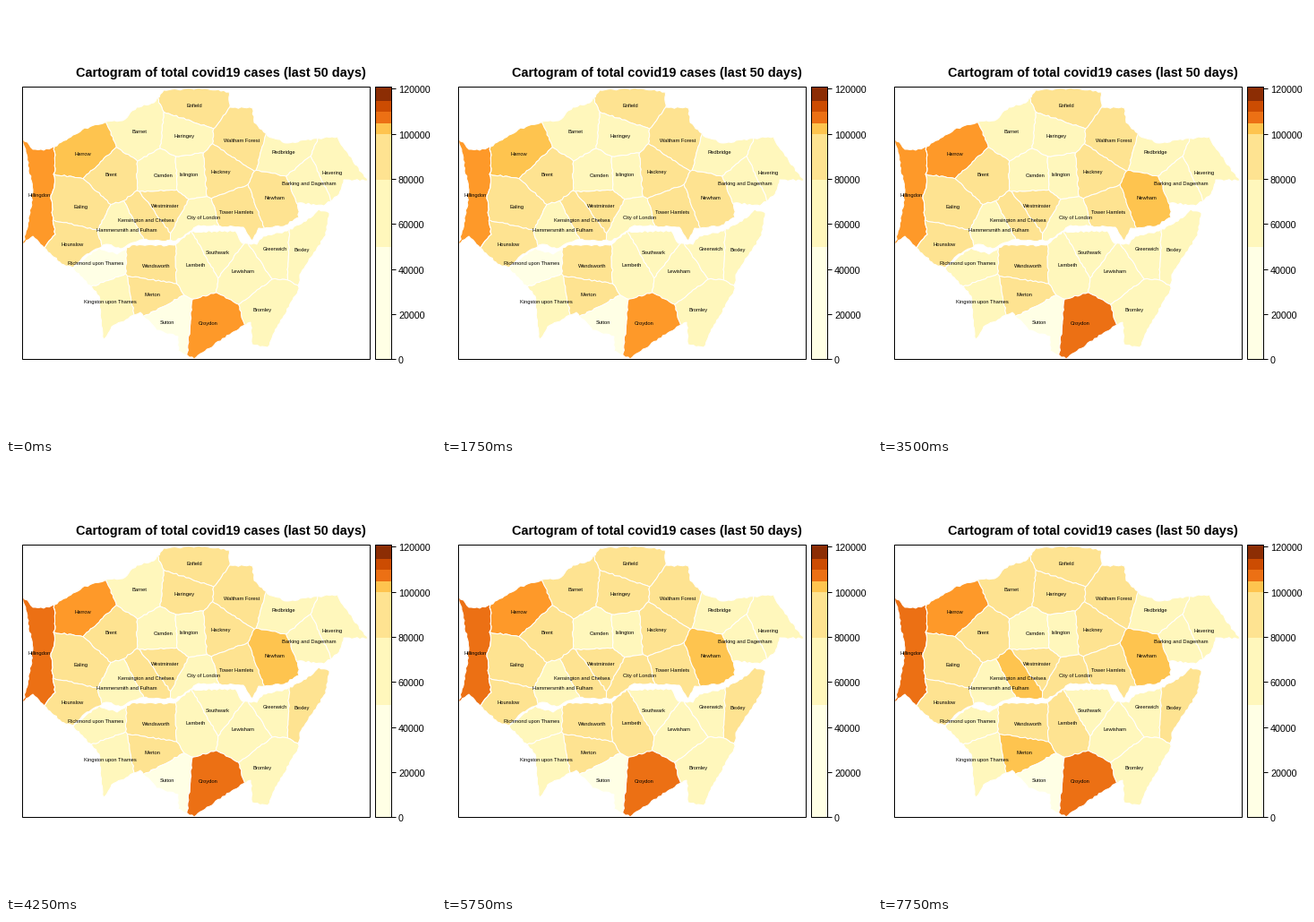
A matplotlib script that plays this animation: 480 px wide and 480 px high, repeating every 8000 ms.

```python
import random

import matplotlib.pyplot as plt
from matplotlib.animation import FuncAnimation
from matplotlib.patches import Polygon, Rectangle

SIZE, DPI = 480, 72
FRAMES, STEP_MS = 32, 250
SHADES = ["#FFFFE5", "#FFF7BC", "#FEE391", "#FEC44F",
          "#FE9929", "#EC7014", "#CC4C02", "#8C2D04"]

# Boroughs by land mass: name, label x and y, first shade
WEST = [("Hillingdon", 37.5, 211, 4)]
NORTH = [
    ("Enfield", 210.5, 111, 2), ("Barnet", 148.5, 140, 1),
    ("Haringey", 199, 145, 1), ("Waltham Forest", 263, 150, 2),
    ("Redbridge", 310, 163, 1), ("Havering", 364.5, 186, 1),
    ("Barking and Dagenham", 338.5, 198, 1), ("Harrow", 85.5, 165, 3),
    ("Brent", 117, 188, 2), ("Ealing", 83.5, 224, 2),
    ("Hounslow", 74, 266, 2), ("Camden", 176, 189, 1),
    ("Islington", 204.5, 188, 1), ("Hackney", 240, 185, 2),
    ("Tower Hamlets", 257.5, 230, 2), ("Newham", 300, 214, 2),
    ("City of London", 220.5, 236, 1), ("Westminster", 177.5, 223, 2),
    ("Kensington and Chelsea", 156, 239, 2),
    ("Hammersmith and Fulham", 135, 250, 1),
]
SOUTH = [
    ("Richmond upon Thames", 100, 287, 0), ("Kingston upon Thames", 116.5, 330, 1),
    ("Wandsworth", 168, 290, 2), ("Merton", 163, 322, 2),
    ("Sutton", 179.5, 353, 0), ("Lambeth", 212, 289, 1),
    ("Southwark", 236.5, 275, 1), ("Lewisham", 264.5, 296, 1),
    ("Greenwich", 300.5, 271, 1), ("Bexley", 330.5, 272, 1),
    ("Bromley", 286.5, 339, 1), ("Croydon", 225.5, 354, 4),
]

# Steps at which a borough moves up one class
RISES = {"Richmond upon Thames": 9, "Harrow": 9, "Newham": 12, "Croydon": 13,
         "Bexley": 16, "Haringey": 17, "Hillingdon": 17, "Lambeth": 18,
         "City of London": 18, "Barnet": 23, "Merton": 24,
         "Kensington and Chelsea": 29}

# Cell centres that lie away from the label
SHIFTS = {"Harrow": (7, -3), "City of London": (-8, 6),
          "Croydon": (6, 4), "Bromley": (10, 0)}

# Key points of the three coasts, clockwise
WEST_COAST = [
    (19, 148), (30, 160), (42, 161), (54, 157), (54, 200), (50, 215), (55, 255),
    (43, 270), (30, 257), (19, 266), (28, 225), (30, 205)]
NORTH_COAST = [
    (54, 157), (85, 138), (112, 129), (130, 128), (146, 113), (165, 108), (176, 94),
    (222, 92), (249, 96), (250, 113), (275, 114), (277, 130), (292, 145), (314, 153),
    (343, 148), (370, 146), (378, 160), (404, 195), (377, 194), (372, 210),
    (355, 223), (326, 220), (327, 236), (310, 246), (282, 248), (275, 262),
    (265, 247), (215, 245), (190, 262), (150, 261), (128, 271), (112, 266),
    (90, 277), (75, 292), (62, 288), (43, 270), (55, 255), (50, 215), (54, 200)]
SOUTH_COAST = [
    (75, 293), (92, 278), (104, 270), (124, 277), (140, 267), (188, 267), (206, 252),
    (256, 251), (264, 265), (280, 266), (287, 257), (314, 251), (335, 240),
    (349, 227), (361, 231), (357, 256), (328, 300), (326, 318), (300, 364),
    (292, 381), (275, 378), (273, 353), (252, 365), (210, 394), (192, 385),
    (192, 369), (168, 362), (150, 342), (118, 358), (109, 372), (104, 324), (85, 303)]

plt.rcParams["font.family"] = "Liberation Sans"
fig = plt.figure(figsize=(SIZE / DPI, SIZE / DPI), dpi=DPI, facecolor="white")
ax = fig.add_axes([0, 0, 1, 1])
ax.set_xlim(0, SIZE)
ax.set_ylim(SIZE, 0)
ax.axis("off")


def rough_edge(a, b, amount):
    """Ragged line from a to b, the same when walked either way."""
    p, q = sorted((a, b))
    rng = random.Random(f"{p[0]:.1f} {p[1]:.1f} {q[0]:.1f} {q[1]:.1f}")
    dx, dy = q[0] - p[0], q[1] - p[1]
    length = max((dx * dx + dy * dy) ** 0.5, 1)
    n = max(1, round(length / 3))
    pts = [p]
    for i in range(1, n):
        off = rng.uniform(-amount, amount) / length
        pts.append((p[0] + dx * i / n - dy * off, p[1] + dy * i / n + dx * off))
    pts.append(q)
    return pts[:-1] if a == p else pts[:0:-1]


def rough_outline(pts, amount):
    return [p for a, b in zip(pts, pts[1:] + pts[:1])
            for p in rough_edge(a, b, amount)]


def nearer_part(poly, site, other):
    """Cut from a convex polygon what lies closer to other than to site."""
    def lead(p):
        return ((p[0] - other[0]) ** 2 + (p[1] - other[1]) ** 2
                - (p[0] - site[0]) ** 2 - (p[1] - site[1]) ** 2)

    kept = []
    for a, b in zip(poly, poly[1:] + poly[:1]):
        la, lb = lead(a), lead(b)
        if la >= 0:
            kept.append(a)
        if (la >= 0) != (lb >= 0):
            t = la / (la - lb)
            kept.append((a[0] + (b[0] - a[0]) * t, a[1] + (b[1] - a[1]) * t))
    return kept


def site_of(name, x, y):
    dx, dy = SHIFTS.get(name, (0, 0))
    return x + dx, y + dy


def draw_land(boroughs, coast):
    """Divide a land mass into one cell for each borough."""
    shore = Polygon(rough_outline(coast, 1.0), facecolor="none", edgecolor="white",
                    linewidth=1, zorder=2)
    ax.add_patch(shore)
    sites = [site_of(name, x, y) for name, x, y, _ in boroughs]
    drawn = []
    for (name, x, y, shade), site in zip(boroughs, sites):
        cell = [(0, 0), (SIZE, 0), (SIZE, SIZE), (0, SIZE)]
        for other in sites:
            if other != site:
                cell = nearer_part(cell, site, other)
        patch = Polygon(rough_outline(cell, 0.8), edgecolor="white", linewidth=1)
        ax.add_patch(patch)
        patch.set_clip_path(shore.get_path(), ax.transData)
        ax.text(x, y, name, fontsize=5.7, ha="center", va="center_baseline", zorder=3)
        drawn.append((patch, shade, RISES.get(name, FRAMES)))
    return drawn


def box(x, y, w, h, fill="none", line="black"):
    ax.add_patch(Rectangle((x, y), w, h, facecolor=fill, edgecolor=line,
                           linewidth=1 if line == "black" else 0,
                           snap=False, zorder=4))


def scale_y(value):
    return 394.5 - value * 301.5 / 120000


areas = (draw_land(WEST, WEST_COAST) + draw_land(NORTH, NORTH_COAST)
         + draw_land(SOUTH, SOUTH_COAST))

# Colour key
breaks = [0, 50000, 80000, 100000, 105000, 110000, 115000, 121000]
for low, high, shade in zip(breaks, breaks[1:], SHADES[:4] + SHADES[5:]):
    top = round(scale_y(high))
    box(412.5, top, 18, round(scale_y(low)) - top, shade, "none")
for value in range(0, 120001, 20000):
    y = round(scale_y(value) - 0.5) + 0.5
    ax.plot([430.5, 435], [y, y], color="black", linewidth=1, snap=False)
    ax.text(438, y + 0.5, str(value), fontsize=10.8, va="center_baseline")

box(18.5, 90.5, 388, 304)
box(412.5, 90.5, 18, 304)
ax.text(239.5, 79, "Cartogram of total covid19 cases (last 50 days)",
        fontsize=14.55, weight="bold", ha="center", va="baseline")


def update(frame):
    for patch, shade, rise in areas:
        patch.set_facecolor(SHADES[shade + (frame >= rise)])
    return [patch for patch, _, _ in areas]


anim = FuncAnimation(fig, update, frames=FRAMES, interval=STEP_MS,
                     repeat=True, repeat_delay=0, blit=False)
plt.show()
```
